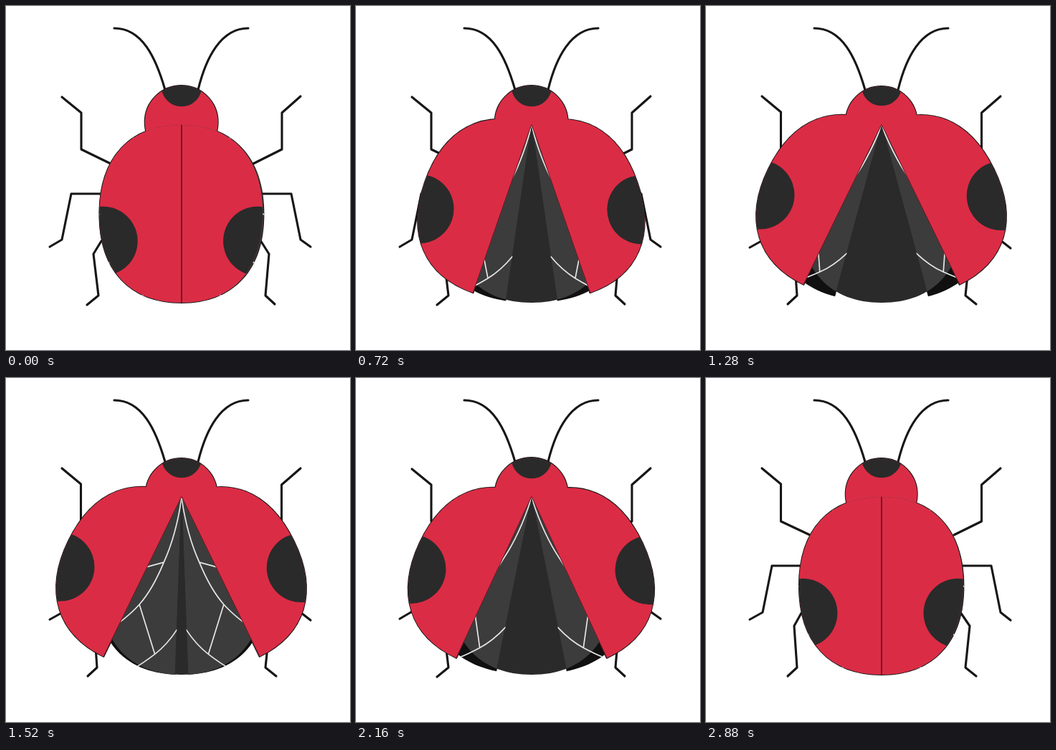
Animation, 480 px wide and 480 px high, one loop 2.96 s. Source, as an HTML page with a canvas:

```html
<!DOCTYPE html>
<html lang="en">
<head>
<meta charset="utf-8">
<title>Ladybird</title>
<style>
  html, body { margin: 0; width: 100%; height: 100%; overflow: hidden; background: #fff; }
  canvas { display: block; width: 480px; height: 480px; }
</style>
</head>
<body>
<canvas id="stage" width="480" height="480"></canvas>
<script>
const ctx = document.getElementById('stage').getContext('2d');
const STEP = 80, STEPS = 37;
const RED = '#db2c45', DARK = '#2a2a2a', INK = '#161616';
const PIVOT = [245, 166];
const RX = 114.5, RY = 124, K = 0.632;

// [time in steps, degrees]
const SHELL = [[0, 0], [12.2, 26], [26.76, 26], [33.1, 0], [37, 0]];
const WING = [[0, 0.4], [8, 0.4], [13, 39.8], [17.8, 0.4], [18.8, 0.4], [23.6, 40], [28.3, 0.4], [37, 0.4]];

// Shapes are relative to the pivot at the neck; the left side is mirrored for the right.
const half = new Path2D(`M0,0 C${-K * RX},0 ${-RX},${RY * (1 - K)} ${-RX},${RY}
  C${-RX},${RY * (1 + K)} ${-K * RX},${2 * RY} 0,${2 * RY} Z`);
const body = new Path2D(`M0,0 C${K * RX},0 ${RX},${RY * (1 - K)} ${RX},${RY}
  C${RX},${RY * (1 + K)} ${K * RX},${2 * RY} 0,${2 * RY}
  C${-K * RX},${2 * RY} ${-RX},${RY * (1 + K)} ${-RX},${RY}
  C${-RX},${RY * (1 - K)} ${-K * RX},0 0,0 Z`);
const seam = new Path2D(`M0,0 V${2 * RY}`);
const veins = new Path2D(`M0,2 Q-6,55 -21.5,92 C-30,115 -42,138 -53.5,152 Q-70,172 -104,196
  M-21.5,92 L-44,99 L-118,127 M-44,99 L-69,14
  M-53.5,152 L-29.5,220.5 M0,185.5 Q-13,207 -29.5,220.5 T-56,240`);

const feelers = 'M151,31 C190,31 209,72 222,117 M338,31 C300,31 279,72 268,117';
const limbs = [
  `M78,127 L105,149 V200 L146,220 M411,126 L385,149 V200 L345,220
   M61,336 L78,326 L91,262 H132 M425,336 L411,326 L398,262 H358
   M113,417 L129,404 L122,346 L133,328 M375,416 L362,404 L367,346 L355,327 ${feelers}`,
  `M78,126 L104.5,148 V200 L147,220 M411,126 L384.5,149 V200 L346,219
   M61,337 L79,327 L92,262 H132 M425,338 L411,327 L398,262 H358
   M114,416 L127,404 L123,346 L133,328 M377,416 L362,404 L368,346 L355,327 ${feelers}`
].map(d => new Path2D(d));

function valueAt(keys, t) {
  const i = keys.findIndex(k => k[0] > t);
  const [t0, a] = keys[i - 1], [t1, b] = keys[i];
  return a + (b - a) * (t - t0) / (t1 - t0);
}

function fill(path, color) {
  ctx.fillStyle = color;
  ctx.fill(path);
}

function stroke(path, color, width) {
  ctx.strokeStyle = color;
  ctx.lineWidth = width;
  ctx.stroke(path);
}

function bothSides(degrees, draw, leftWidth = 1, rightWidth = 1) {
  for (const side of [1, -1]) {
    ctx.save();
    ctx.scale(side, 1);
    ctx.rotate(degrees * Math.PI / 180);
    ctx.scale(side > 0 ? leftWidth : rightWidth, 1);
    draw(side);
    ctx.restore();
  }
}

function circle(x, y, r) {
  const path = new Path2D();
  path.arc(x, y, r, 0, 2 * Math.PI);
  return path;
}

function drawWings(angle, head) {
  const inside = new Path2D(head);
  inside.addPath(body);
  ctx.save();
  ctx.clip(inside);
  bothSides(angle, () => {
    fill(half, 'rgba(255,255,255,0.085)');
    stroke(seam, DARK, 1);
  });
  ctx.restore();
  bothSides(angle, () => {
    ctx.clip(half);
    stroke(veins, '#e6e6e6', 1.7);
  });
}

function draw(step) {
  const redrawn = step % 3 === 1 || step === STEPS - 1;
  const shell = valueAt(SHELL, step), wing = valueAt(WING, step);
  const widths = redrawn ? [1.005, 0.995] : [1, 0.988];
  const head = circle(-0.3, -4, redrawn ? 50 : 51);

  ctx.fillStyle = '#fff';
  ctx.fillRect(0, 0, 480, 480);
  ctx.lineCap = ctx.lineJoin = 'round';
  ctx.save();
  ctx.translate(...PIVOT);
  bothSides(wing, () => fill(half, '#101010'));
  ctx.restore();
  stroke(limbs[redrawn ? 1 : 0], INK, 3.1);

  ctx.save();
  ctx.translate(...PIVOT);
  bothSides(shell, () => stroke(half, INK, 2), ...widths);
  stroke(head, INK, 2);
  fill(head, RED);
  ctx.save();
  ctx.clip(head);
  fill(circle(0, redrawn ? -55 : -54, 28.3), DARK);
  ctx.restore();
  fill(body, DARK);
  drawWings(wing, head);
  bothSides(shell, side => {
    fill(half, RED);
    ctx.clip(half);
    fill(circle(side > 0 ? -109.5 : -107, 162, 48.2), DARK);
    stroke(seam, '#40141c', 1.4);
  }, ...widths);
  ctx.restore();
}

const start = performance.now();
function tick() {
  draw(Math.floor((performance.now() - start) / STEP) % STEPS);
  requestAnimationFrame(tick);
}
tick();
</script>
</body>
</html>
```
